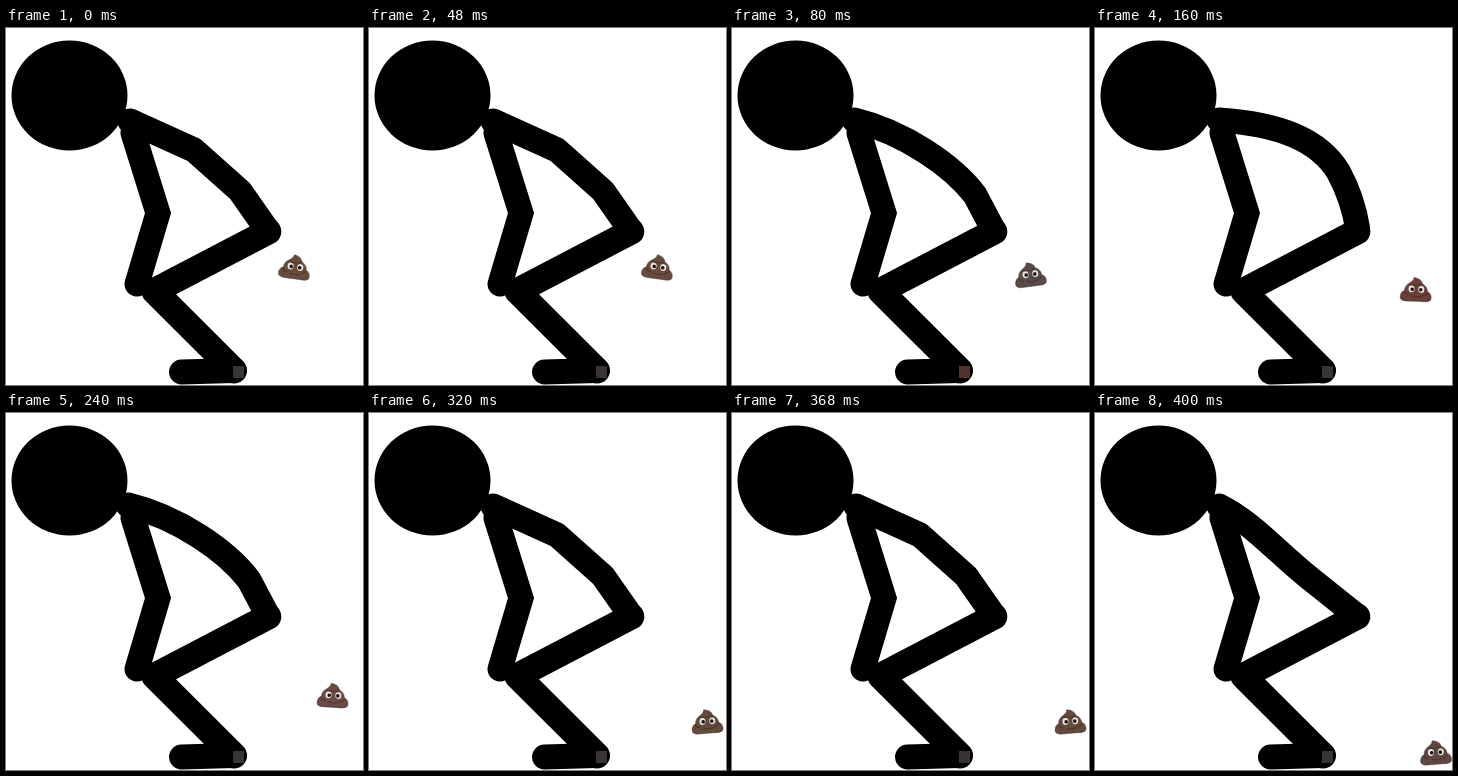
An HTML page that plays this animation: 357 px wide and 357 px high, repeating every 0.48 s.

```html
<!DOCTYPE html>
<html lang="en">
<head>
<meta charset="utf-8">
<title>Stick figure</title>
<style>
  html, body { margin: 0; width: 100%; height: 100%; overflow: hidden; background: #fff; }
  svg { display: block; width: 100vw; height: 100vh; }
  .limb { fill: none; stroke: #000; stroke-width: 25; stroke-linecap: round; stroke-linejoin: round; }
</style>
</head>
<body>
<svg viewBox="0 0 357 357">
  <ellipse cx="63.5" cy="67.5" rx="58" ry="55"/>
  <g class="limb">
    <path id="back"/>
    <path d="M127 105L152 185L131 256" stroke-linejoin="miter"/>
    <path d="M262.3 203.5L148.3 263L228 342.5" stroke-width="26"/>
    <path d="M175.5 344L228 342.5"/>
  </g>
  <rect id="patch" x="227" y="338" width="11" height="12"/>
  <g id="poo">
    <path id="body" stroke="#3a2722" stroke-opacity=".45" d="M-2.5 -12C2 -11.5 5.5 -9 6 -6C9 -4.5 11.5 -1.5 11.5 1.5C14.5 3 16 6 15.4 9C14.5 11.8 11 12 6 11.8L-9 12C-14 12 -15.8 10 -15.4 7C-15 4 -13.5 2.5 -11.5 1.5C-11.5 -1.5 -9.5 -4.5 -7 -6C-5 -7.5 -2.5 -9 -2.5 -12Z"/>
    <path d="M-7 -5Q0 -3 6 -6M-11.5 2Q-12 5 -7 6M11.5 2Q11 5 7 6M-4 6.5Q1 8.5 6 6.5" fill="none" stroke="#2d1d19" stroke-opacity=".5"/>
    <g fill="#ece7e3">
      <ellipse cx="-4.5" cy="-.3" rx="3" ry="3.4"/>
      <ellipse cx="5.3" cy="-.3" rx="3" ry="3.4"/>
    </g>
    <circle cx="-3.8" cy="0" r="1.8" fill="#181211"/>
    <circle cx="4.8" cy="0" r="1.8" fill="#181211"/>
  </g>
</svg>
<script>
const STEP = 80;
const bent = "M124 93L188 122L234 163L262 203";
const round = "M122 92C172 104 221 138 243 167L262 203";
const arched = "M124 92C185 96 224 112 243.5 144Q258 171 262.5 200";
const sagging = "M124 93C160 111 185 143 222 171L262 203";
const grey = "#383436", brown = "#50352d";

// back shape, then x, y, tilt and colour of the falling piece, patch colour
const poses = [
  [bent, 289, 239, 9, "#694b3e", grey],
  [round, 298, 246.5, -7, "#5a4a48", brown],
  [arched, 321, 261.5, 3, "#693f37", grey],
  [round, 327, 282.5, 4, "#6c4a43", grey],
  [bent, 338, 308.5, -4, "#624a3c", grey],
  [sagging, 340.5, 339.5, -4, "#5f4841", grey]
];

const [back, patch, poo, body] =
  ["back", "patch", "poo", "body"].map(id => document.getElementById(id));
const start = performance.now();

function draw() {
  const time = Math.max(0, performance.now() - start);
  const [spine, x, y, tilt, colour, tint] = poses[Math.floor(time / STEP) % poses.length];
  back.setAttribute("d", spine);
  patch.setAttribute("fill", tint);
  poo.setAttribute("transform", `translate(${x} ${y}) rotate(${tilt})`);
  body.setAttribute("fill", colour);
  requestAnimationFrame(draw);
}
draw();
</script>
</body>
</html>
```
